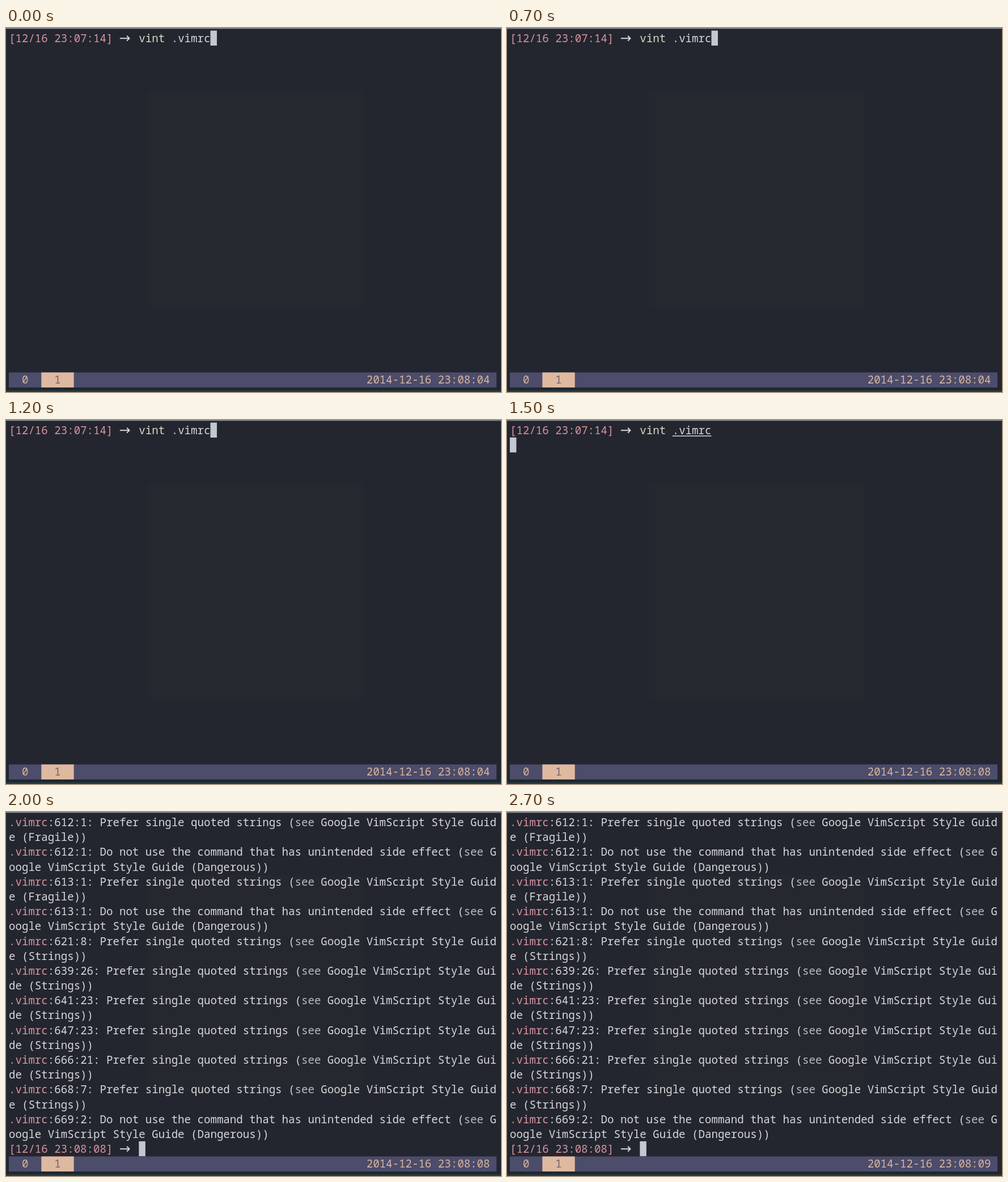
Recreate the animation shown at these times as an HTML page. Size 873 px wide and 642 px high, loop 2800 ms.

```html
<!DOCTYPE html>
<html lang="en">
<head>
<meta charset="utf-8">
<title>Terminal</title>
<style>
  html, body { margin: 0; width: 100%; height: 100%; overflow: hidden; background: #23262f; }
  svg { display: block; width: 873px; height: 642px; }
  text { font: 19.11px "Noto Sans Mono", "Liberation Mono", monospace; white-space: pre; fill: #d6d8da; }
  .arrow { font: 24px "DejaVu Sans", sans-serif; }
  .pink { fill: #d8939f; }
  .cmd { fill: #d5dcc1; }
  .dim { fill: #b9bbc2; }
  .tan { fill: #d9b69d; }
  .dark { fill: #715f6c; }
  .cursor { fill: #c3c7d2; }

  /* Hard cuts at 1500, 1600 and 2300 ms of a 2800 ms loop */
  .typed, .wait, .prompt, .result, .t4, .t8, .t9 { animation: 2800ms step-end infinite; }
  .typed, .t4 { animation-name: first; }
  .wait { animation-name: wait; }
  .prompt { animation-name: prompt; }
  .result { animation-name: result; }
  .t8 { animation-name: mid; }
  .t9 { animation-name: last; }
  @keyframes first { 0% { visibility: visible } 53.571%, 100% { visibility: hidden } }
  @keyframes wait { 0% { visibility: hidden } 53.571% { visibility: visible } 57.142%, 100% { visibility: hidden } }
  @keyframes prompt { 0% { visibility: visible } 57.142%, 100% { visibility: hidden } }
  @keyframes result { 0% { visibility: hidden } 57.142%, 100% { visibility: visible } }
  @keyframes mid { 0% { visibility: hidden } 53.571% { visibility: visible } 82.142%, 100% { visibility: hidden } }
  @keyframes last { 0% { visibility: hidden } 82.142%, 100% { visibility: visible } }
</style>
</head>
<body>
<svg id="stage" viewBox="0 0 873 642"></svg>
<script>
const COL = 11.467, ROW = 26.19, LEFT = 5, COLS = 75;
const x = col => LEFT + col * COL;
const y = row => 25 + row * ROW;

const rect = (x, y, w, h, fill) => `<rect x="${x}" y="${y}" width="${w}" height="${h}" fill="${fill}"/>`;
const text = (col, row, str, cls = "") => `<text x="${x(col)}" y="${y(row)}" class="${cls}">${str}</text>`;
const span = (str, cls) => `<tspan class="${cls}">${str}</tspan>`;
const group = (cls, ...parts) => `<g class="${cls}">${parts.join("")}</g>`;
const cursor = (col, row) =>
  `<rect class="cursor" x="${x(col)}" y="${4.6 + row * ROW}" width="${COL}" height="26.4"/>`;
const prompt = (row, time) =>
  text(0, row, `[12/16 ${time}]`, "pink") +
  `<text class="arrow" x="199.5" y="${y(row) + 1}">→</text>`;

const QUOTES = "Prefer single quoted strings";
const EFFECT = "Do not use the command that has unintended side effect";
const issues = [
  ["612:1", QUOTES, "Fragile"],
  ["612:1", EFFECT, "Dangerous"],
  ["613:1", QUOTES, "Fragile"],
  ["613:1", EFFECT, "Dangerous"],
  ["621:8", QUOTES, "Strings"],
  ["639:26", QUOTES, "Strings"],
  ["641:23", QUOTES, "Strings"],
  ["647:23", QUOTES, "Strings"],
  ["666:21", QUOTES, "Strings"],
  ["668:7", QUOTES, "Strings"],
  ["669:2", EFFECT, "Dangerous"]
];

// Each message wraps onto a second row
function issue([pos, message, rule], i) {
  const line = `.vimrc:${pos}: ${message} (see Google VimScript Style Guide (${rule}))`;
  const head = line.slice(0, COLS)
    .replace(".vimrc", span(".vimrc", "pink"))
    .replace("(see", "(" + span("see", "dim"));
  return text(0, i * 2, head) + text(0, i * 2 + 1, line.slice(COLS));
}

const clock = (time, cls) => text(55, 23, `2014-12-16 ${time}`, `tan ${cls}`);

document.getElementById("stage").innerHTML = [
  rect(0, 0, 873, 642, "#23262f"),
  rect(0, 0, 873, 1.5, "#85878d"),
  rect(250, 112, 380, 380, "#25282f"),
  rect(0, 639, 873, 3, "#243c43"),
  group("prompt",
    prompt(0, "23:07:14"),
    text(20, 0, span("vint", "cmd") + " .vimrc")),
  group("typed", cursor(31, 0)),
  group("wait", rect(x(25), 27.5, COL * 6, 1.5, "#d6d8da"), cursor(0, 1)),
  group("result", ...issues.map(issue), prompt(22, "23:08:08"), cursor(20, 22)),
  rect(LEFT, 607.5, 860, 26.5, "#4c4c6b"),
  rect(x(5), 607.5, COL * 5, 26.5, "#deb99f"),
  text(2, 23, "0", "tan"),
  text(7, 23, "1", "dark"),
  clock("23:08:04", "t4"),
  clock("23:08:08", "t8"),
  clock("23:08:09", "t9")
].join("");
</script>
</body>
</html>
```
